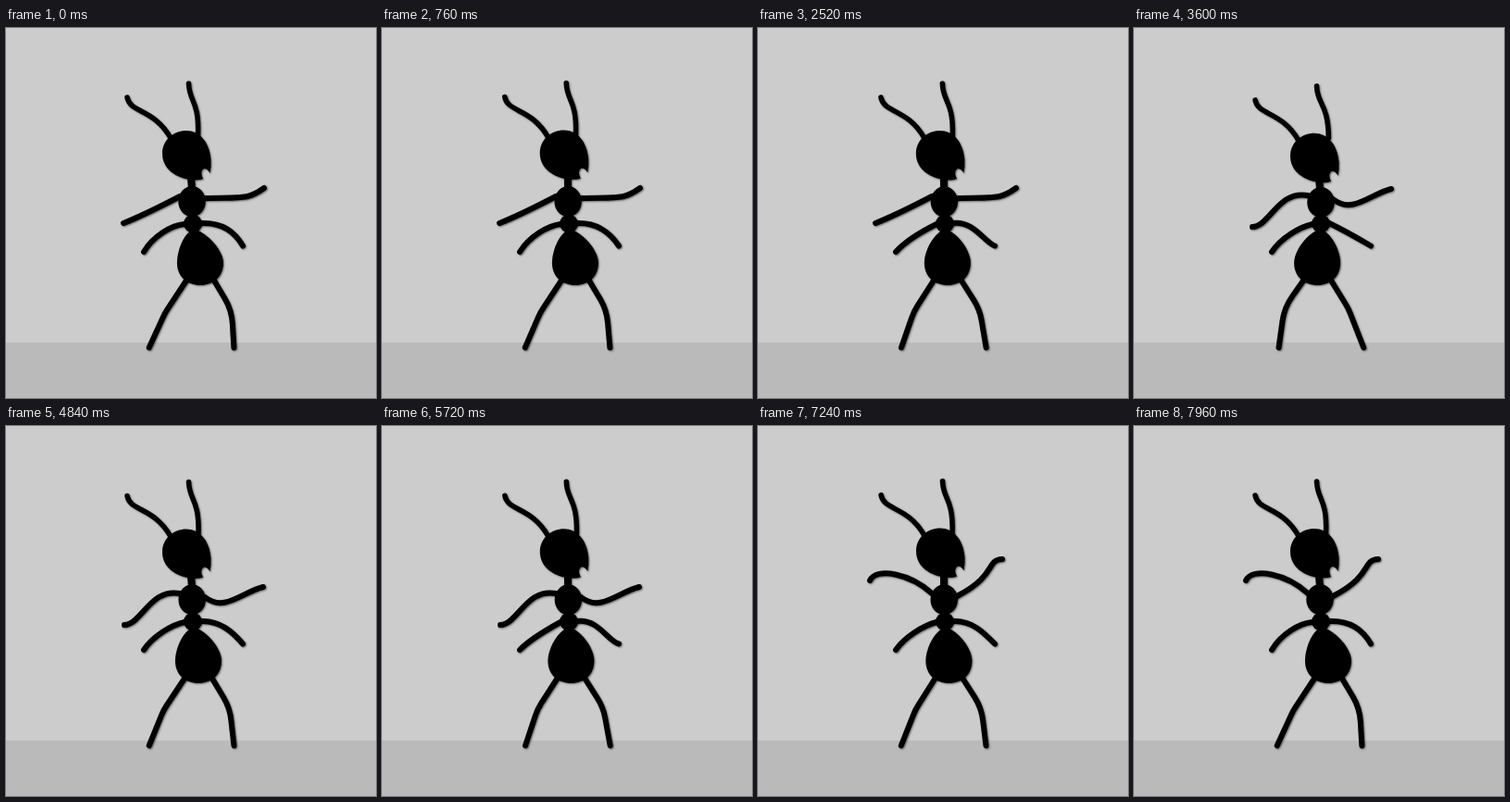
Animation of 400x400 px, one loop 8000 ms. Source, as an HTML page with a canvas:

```html
<!DOCTYPE html>
<html lang="en">
<head>
<meta charset="utf-8">
<title>Dancing ant</title>
<style>
  html, body { margin: 0; width: 100%; height: 100%; overflow: hidden; background: #ccc; }
  canvas { display: block; width: 100vw; height: 100vh; }
</style>
</head>
<body>
<canvas id="stage" width="400" height="400"></canvas>
<script>
const ctx = document.getElementById('stage').getContext('2d');
const LOOP = 8000, BEAT = 796;
const BEND_AT = 4 * BEAT, LIFT_AT = 8 * BEAT;

// Upper arm curves: shoulder, two handles, hand
const LOW = {
  left: [188, 182, 165, 194, 147, 203, 127, 211],
  right: [215, 184, 255, 183, 261, 186, 279, 173]
};
const BENT = {
  left: [188, 181, 156, 175, 147, 214, 128, 215],
  right: [215, 185, 236, 202, 256, 179, 278, 174]
};
const HIGH = {
  left: [188, 181, 165, 160, 128, 152, 121, 167],
  right: [215, 184, 259, 161, 246, 145, 264, 144]
};

const mix = (a, b, k) => a + (b - a) * k;
const mixCurve = (a, b, k) => a.map((v, i) => mix(v, b[i], k));
const ramp = (t, from, length) => Math.min(1, Math.max(0, (t - from) / length));

function limb([x, y, ...rest], width = 6) {
  ctx.lineWidth = width;
  ctx.beginPath();
  ctx.moveTo(x, y);
  ctx.bezierCurveTo(...rest);
  ctx.stroke();
}

function leg(hipX, kneeX, kneeY, footX) {
  ctx.lineWidth = 6;
  ctx.beginPath();
  ctx.moveTo(hipX, 273);
  ctx.arcTo(kneeX, kneeY, footX, 345.5, 60);
  ctx.lineTo(footX, 345.5);
  ctx.stroke();
}

function oval(x, y, rx, ry) {
  ctx.beginPath();
  ctx.ellipse(x, y, rx, ry, 0, 0, Math.PI * 2);
  ctx.fill();
}

function head(dx, dy, sway) {
  ctx.save();
  ctx.translate(dx, dy);
  limb([131, 75, 134, 92, 160, 87, 178, 119], 5.5);
  limb([197.5, 60, 198, 80, 209 + sway, 78, 207.5 + 3 * sway, 116], 5.5);
  ctx.beginPath();
  ctx.moveTo(195, 111);
  ctx.bezierCurveTo(209, 111, 220, 123, 221.5, 142);
  ctx.quadraticCurveTo(222, 150, 220.5, 157);
  ctx.quadraticCurveTo(218, 152, 214, 152);
  ctx.quadraticCurveTo(209, 155, 213, 163);
  ctx.quadraticCurveTo(209, 165, 202, 164);
  ctx.bezierCurveTo(184, 163, 169, 152, 169, 136);
  ctx.bezierCurveTo(169, 121, 181, 111, 195, 111);
  ctx.fill();
  ctx.restore();
}

// Pear hanging from the waist, its belly centred on x
function abdomen(x) {
  const top = mix(202, x, 0.2);
  ctx.beginPath();
  ctx.moveTo(top, 218);
  ctx.bezierCurveTo(top + 9, 218, x + 25, 238, x + 25, 254);
  ctx.bezierCurveTo(x + 25, 269, x + 14, 278, x, 278);
  ctx.bezierCurveTo(x - 14, 278, x - 25, 269, x - 25, 254);
  ctx.bezierCurveTo(x - 25, 238, top - 9, 218, top, 218);
  ctx.fill();
}

function lowerArms(sway, wave) {
  const drop = 7 * wave + 2 * sway;
  limb([193, 212, 179, 213 + drop, 159, 225 + drop, 149, 242]);
  limb([211, 211,
    230 - 4 * sway + 7 * wave, 210 + 9 * sway - 6 * wave,
    246 - 5 * sway, 218 + 9 * sway + 14 * wave,
    256, 235.5]);
}

function drawStage() {
  ctx.shadowColor = 'transparent';
  ctx.fillStyle = '#cccccc';
  ctx.fillRect(0, 0, 400, 400);
  ctx.fillStyle = '#bababa';
  ctx.fillRect(0, 340, 400, 60);
}

function drawAnt(t) {
  const beat = t / BEAT;
  const sway = 1 - Math.abs(2 * (beat % 1) - 1);
  const wave = Math.sin(Math.PI * sway) ** 2;
  const odd = beat % 2 >= 1;
  const hip = odd ? mix(208.5, 197.5, sway) : mix(210, 197.5, sway);
  const step = 2 * sway * sway;
  // Every second beat the head pops up and forward
  const nod = Math.max(0, Math.cos(Math.PI * (beat % 2 - 1.08)));
  const pop = nod ** 2;

  ctx.fillStyle = ctx.strokeStyle = '#000';
  ctx.lineCap = ctx.lineJoin = 'round';
  ctx.shadowColor = 'rgba(0,0,0,0.5)';
  ctx.shadowBlur = 2;
  ctx.shadowOffsetX = ctx.shadowOffsetY = 1;

  leg(hip - 15, mix(172, 162, sway), mix(308, 302, sway), 154.7 + step);
  leg(hip + 15, mix(244, 231, sway), mix(305, 303, sway), 246.4 + step);
  lowerArms(sway, wave);

  for (const side of ['left', 'right']) {
    const bent = mixCurve(LOW[side], BENT[side], ramp(t, BEND_AT, 400));
    limb(mixCurve(bent, HIGH[side], ramp(t, LIFT_AT, 550)));
  }

  abdomen(hip);
  oval(202, 211.5, 10, 10);
  oval(201 + sway, 187.5 + sway, 14.7, 16.5);
  limb([200 + pop, 160, 200 + pop, 166, 201, 170, 201, 176], 8);
  head(2 * pop, 3 * sway - pop, sway);
}

const start = performance.now();
function tick() {
  drawStage();
  drawAnt((performance.now() - start) % LOOP);
  requestAnimationFrame(tick);
}
tick();
</script>
</body>
</html>
```
